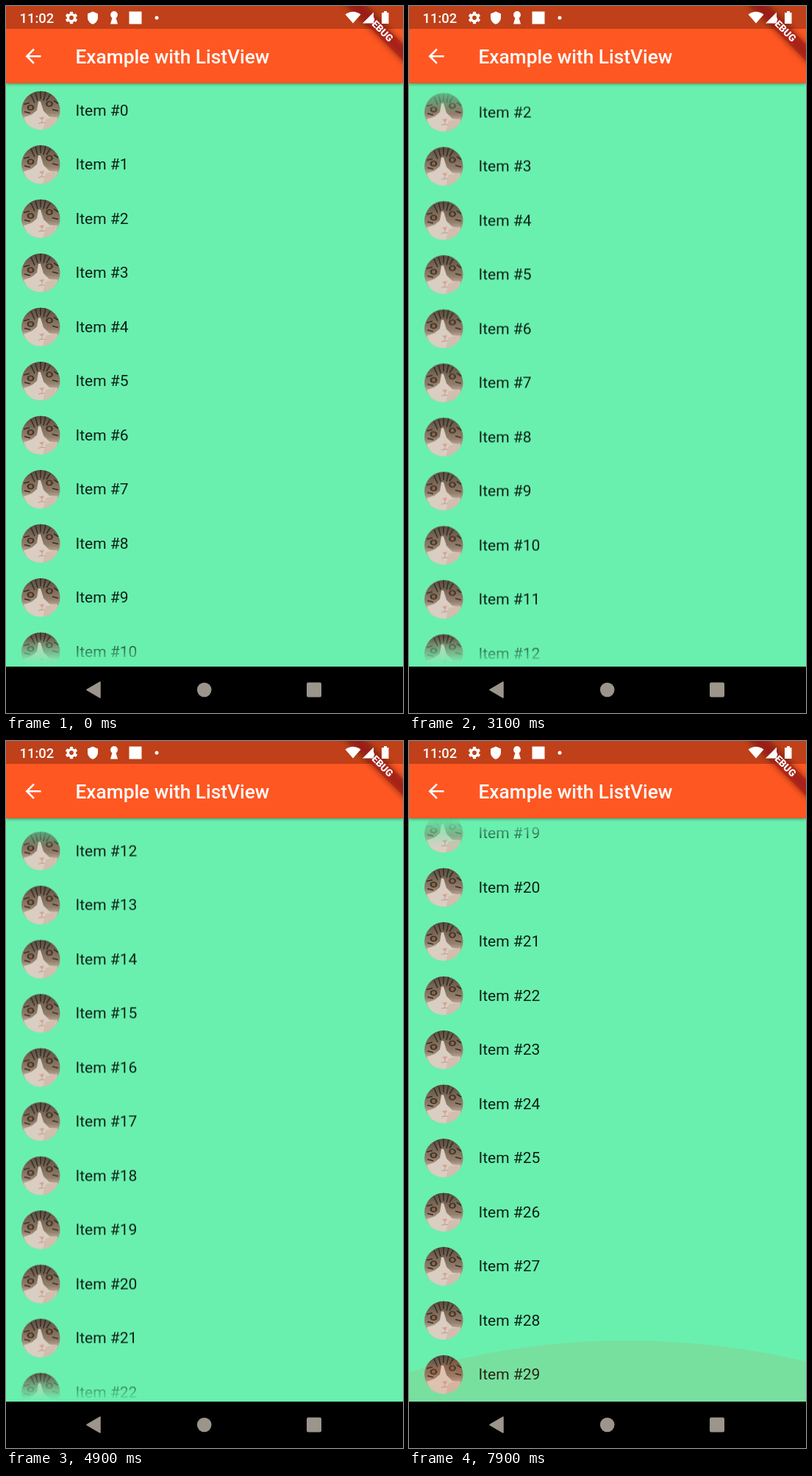
An HTML page that plays this animation: 540 by 960 pixels, repeating every 8000 ms.

```html
<!DOCTYPE html>
<html lang="en">
<head>
<meta charset="utf-8">
<title>Example with ListView</title>
<style>
  html, body { margin: 0; width: 100%; height: 100%; overflow: hidden; }
  body { position: relative; background: #69f0ae; font-family: Roboto, sans-serif; }
  #view { position: absolute; left: 0; top: 105px; width: 540px; height: 792px; overflow: hidden; }
  #fade {
    --top: 0px; --bottom: 40px;
    height: 100%; overflow: hidden;
    -webkit-mask-image: linear-gradient(transparent, #000 var(--top), #000 calc(100% - var(--bottom)), transparent);
    mask-image: linear-gradient(transparent, #000 var(--top), #000 calc(100% - var(--bottom)), transparent);
  }
  #rows { position: relative; will-change: transform; }
  /* Each row is its own layer, so half-pixel offsets are kept. */
  #rows svg { position: absolute; left: 0; top: 0; will-change: transform; }
  #rows text { font-size: 21px; fill: rgba(0, 0, 0, .87); }
  #glow, #chrome { position: absolute; left: 0; top: 0; }
  #bar {
    position: absolute; left: 0; top: 0; width: 540px; height: 105px;
    background: linear-gradient(#bf4019 31px, #ff5722 31px);
    box-shadow: 0 1px 4px rgba(0, 0, 0, .4);
  }
</style>
</head>
<body>
<svg width="0" height="0" style="position:absolute">
  <defs>
    <clipPath id="disc"><circle cx="26.25" cy="26.25" r="26.25"/></clipPath>
    <linearGradient id="fur" x2="0" y2="1">
      <stop offset="0" stop-color="#564b40"/>
      <stop offset=".3" stop-color="#7d6b59"/>
      <stop offset=".55" stop-color="#94806c"/>
      <stop offset=".75" stop-color="#c8b7a7"/>
      <stop offset="1" stop-color="#cabbad"/>
    </linearGradient>
    <symbol id="cat" viewBox="0 0 52.5 52.5">
      <g clip-path="url(#disc)">
        <path fill="url(#fur)" d="M0 0h53v53H0z"/>
        <g style="filter:blur(.6px)">
          <path fill="none" stroke="#372e26" stroke-width="1.6" d="M13 5l5 11M19 2l3 11M26 0v11M33 1l-3 12M39 5l-5 8M3 18l8-2M44 13l6 4M4 28l8 2M42 25l8 2"/>
          <path fill="#dacdc2" d="M23 14h3l4 13 8 8 11 1-8 17H12L3 36l11-4 7-6z"/>
          <path fill="#d3bdad" d="M33 38l15-3-6 18H29z"/>
          <ellipse cx="12.500" cy="22.500" rx="5" ry="4" fill="#43352a"/>
          <ellipse cx="38" cy="17.500" rx="5" ry="4" fill="#43352a"/>
          <circle cx="12.500" cy="22.500" r="2.500" fill="#86684e"/>
          <circle cx="38" cy="17.500" r="2.500" fill="#86684e"/>
          <path fill="#d79f90" d="M24 36l7-1-2.500 5z"/>
          <path fill="none" stroke="#c09a8c" d="M28 40l-1 3-4 1m4-1l5 0"/>
        </g>
      </g>
    </symbol>
  </defs>
</svg>

<div id="view">
  <div id="fade"><div id="rows"></div></div>
  <svg id="glow" width="540" height="792"><ellipse fill="#ff5722" cx="297" rx="810"/></svg>
</div>

<div id="bar"></div>
<svg id="chrome" width="540" height="960" font-family="Roboto, sans-serif" fill="#fff">
  <path transform="translate(21.250 52.500) scale(1.3125)" d="M20 11H7.830l5.590-5.590L12 4l-8 8 8 8 1.410-1.410L7.830 13H20z"/>
  <text x="94.500" y="78" font-size="26.250" font-weight="500">Example with ListView</text>

  <g transform="translate(540) rotate(45)">
    <rect x="-60" y="36.750" width="120" height="15.750" style="filter:blur(5px)" fill="#000" opacity=".5"/>
    <rect x="-60" y="36.750" width="120" height="15.750" fill="#b71c1c" opacity=".63"/>
    <text y="48.500" font-size="13.400" font-weight="900" text-anchor="middle">DEBUG</text>
  </g>

  <text x="18.500" y="23" font-size="18.400" font-weight="500">11:02</text>
  <g fill="none" stroke="#fff" transform="translate(89 16) rotate(-90)">
    <circle r="4.600" stroke-width="3.400"/>
    <circle r="7" stroke-width="2.600" pathLength="60" stroke-dasharray="5.500 4.500" stroke-dashoffset="2.750"/>
  </g>
  <path d="M118 7.500l7 3v5c0 4.500-3 8-7 9.300-4-1.300-7-4.800-7-9.300v-5z"/>
  <circle cx="147" cy="12" r="4.900"/>
  <path d="M145 14h4l3 10.500h-10z"/>
  <rect x="167.500" y="7.500" width="17" height="17"/>
  <circle cx="205" cy="16" r="2.500"/>
  <path d="M461.500 11.500Q472 4 482.500 11.500L472 23.500z"/>
  <path d="M485 23.500L500 8.500v15z"/>
  <path d="M514 7h4v2h2.500v15h-9.500V9h3z"/>

  <path fill="#000" d="M0 897h540v63H0z"/>
  <g fill="#9b958b">
    <path d="M110 928.500L128 918v21z" stroke="#9b958b" stroke-width="1.500" stroke-linejoin="round"/>
    <circle cx="269.700" cy="928.500" r="9.800"/>
    <rect x="409" y="918.500" width="20" height="20" rx="2"/>
  </g>
</svg>

<script>
  const LOOP = 8000, STEP = 100, END = 1413, FADE = 40, PITCH = 73.5;
  const VIEW_H = 792, GLOW_H = 108.5, GLOW_R = 810;
  // [time in ms, scroll offset in px]
  const path = [[0, 0], [2400, 0], [3100, 144.5], [4300, 361.5],
    [4900, 874.5], [6000, 1200.5], [7450, END], [8000, END]];

  const $ = id => document.getElementById(id);
  const rows = $('rows'), fade = $('fade'), dome = $('glow').firstElementChild;

  const row = i => `
    <svg width="540" height="74" style="transform:translateY(${PITCH * i - 0.5}px)">
      <use href="#cat" x="21" y="11" width="52.5" height="52.5"/>
      <text x="94.5" y="44">Item #${i}</text>
    </svg>`;
  rows.innerHTML = Array.from({ length: 30 }, (_, i) => row(i)).join('');

  const slope = i => (path[i + 1][1] - path[i][1]) / (path[i + 1][0] - path[i][0]);

  // Harmonic mean of neighbouring slopes keeps the curve from overshooting.
  function tangent(i) {
    if (i === 0 || i === path.length - 1) return 0;
    const a = slope(i - 1), b = slope(i);
    return a * b > 0 ? 2 * a * b / (a + b) : 0;
  }

  function scrollAt(t) {
    let i = 0;
    while (i < path.length - 2 && t >= path[i + 1][0]) i++;
    const [t0, y0] = path[i], [t1, y1] = path[i + 1];
    const d = t1 - t0, u = (t - t0) / d, v = 1 - u;
    return y0 * v * v * (1 + 2 * u) + y1 * u * u * (3 - 2 * u)
      + d * u * v * (tangent(i) * v - tangent(i + 1) * u);
  }

  function drawGlow(t) {
    const pull = Math.min(1, Math.max(0, (t - 7450) / 450));
    const size = pull ? Math.max(0, 1 - 1 / (0.7 * Math.sqrt(37 * pull))) : 0;
    dome.setAttribute('cy', VIEW_H + (GLOW_R - GLOW_H) * size);
    dome.setAttribute('ry', GLOW_R * size);
    dome.setAttribute('opacity', 0.1 * pull);
  }

  function draw(now) {
    const t = Math.floor((now % LOOP) / STEP) * STEP;
    const y = scrollAt(t);
    rows.style.transform = `translateY(${-y}px)`;
    fade.style.setProperty('--top', (y > 0.5 ? FADE : 0) + 'px');
    fade.style.setProperty('--bottom', (y < END - 0.5 ? FADE : 0) + 'px');
    drawGlow(t);
  }

  const start = performance.now();
  function tick() {
    draw(performance.now() - start);
    requestAnimationFrame(tick);
  }
  tick();
</script>
</body>
</html>
```
